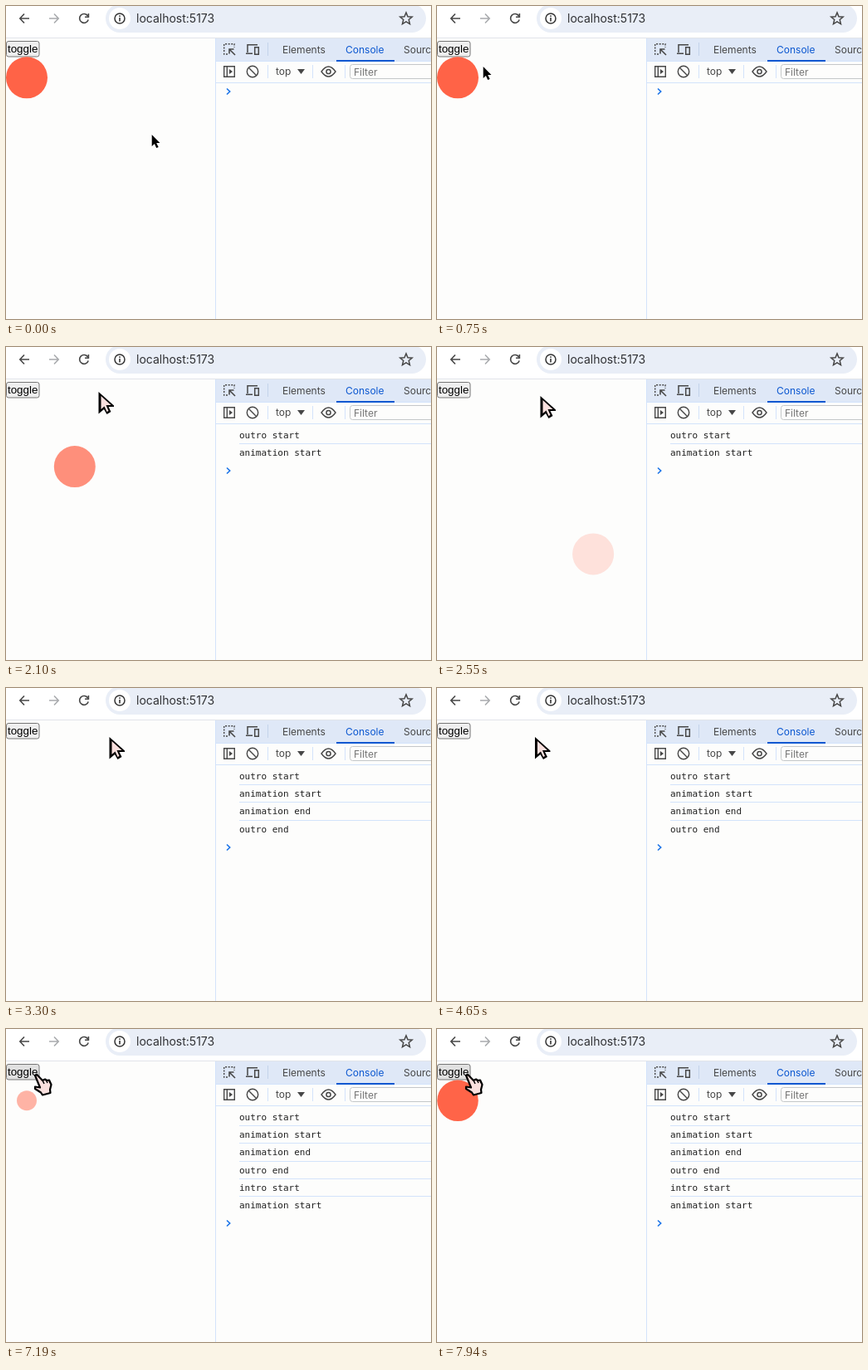
Recreate the animation shown at these times as an HTML page with a canvas. Size 512x377 px, loop 8 s.

```html
<!DOCTYPE html>
<html lang="en">
<head>
<meta charset="utf-8">
<title>Transition events</title>
<style>
  html, body { margin: 0; width: 100%; height: 100%; overflow: hidden; background: #fdfdfc; }
  canvas { display: block; }
</style>
</head>
<body>
<canvas id="stage" width="512" height="377"></canvas>
<script>
const ctx = document.getElementById('stage').getContext('2d');
const LOOP = 8000, STEP = 150, SHIFT = 5240;
const PAGE = '#fdfdfc', INK = '#474747', BLUE = '#0b57d0', LINE = '#d3e3fb', PINK = '#f9e0de';
const UI = 'Inter, sans-serif';

const LOGS = [
  [1350, 'outro start'], [1350, 'animation start'],
  [3300, 'animation end'], [3300, 'outro end'],
  [6290, 'intro start'], [6290, 'animation start']
];

// Pointer tip: time, x, y
const POINTER = [
  [0, 175, 155], [299, 175, 155], [300, 151, 154], [450, 119, 127], [600, 84, 97],
  [750, 55, 73], [900, 39, 58], [1050, 34, 53], [1200, 33, 52], [1500, 33, 52],
  [1650, 43, 53], [1800, 65, 54], [1950, 92, 54], [2100, 111.5, 54], [2250, 122, 58],
  [2400, 124.5, 59], [4500, 124.5, 59], [4650, 118, 59], [4800, 94, 58], [4950, 63, 56],
  [5100, 41, 55], [5240, 36, 55], [8000, 36, 55]
];

const cubicInOut = p => p < 0.5 ? 4 * p ** 3 : 1 - 4 * (1 - p) ** 3;
const progress = (t, start) => cubicInOut(Math.min(1, Math.max(0, (t - start) / 2000)));
const within = (t, a, b) => t >= a && t < b;

function rect(x, y, w, h, color) {
  ctx.fillStyle = color;
  ctx.fillRect(x, y, w, h);
}

function text(str, x, y, font, color) {
  ctx.font = font;
  ctx.fillStyle = color;
  ctx.fillText(str, x, y);
}

function stroke(d, color = INK, width = 1.4) {
  ctx.strokeStyle = color;
  ctx.lineWidth = width;
  ctx.stroke(new Path2D(d));
}

function fill(d, color) {
  ctx.fillStyle = color;
  ctx.fill(new Path2D(d));
}

function disc(x, y, r, color, alpha = 1) {
  ctx.globalAlpha = alpha;
  ctx.fillStyle = color;
  ctx.beginPath();
  ctx.arc(x, y, r, 0, 7);
  ctx.fill();
  ctx.globalAlpha = 1;
}

function ring(x, y, r, color, width) {
  ctx.strokeStyle = color;
  ctx.lineWidth = width;
  ctx.beginPath();
  ctx.arc(x, y, r, 0, 7);
  ctx.stroke();
}

function box(x, y, w, h, r, background, border) {
  ctx.beginPath();
  ctx.roundRect(x, y, w, h, r);
  ctx.fillStyle = background;
  ctx.fill();
  if (!border) return;
  ctx.strokeStyle = border;
  ctx.lineWidth = 1;
  ctx.stroke();
}

function starPath(x, y, outer, inner) {
  let d = '';
  for (let i = 0; i < 10; i++) {
    const r = i % 2 ? inner : outer, a = i * Math.PI / 5 - Math.PI / 2;
    d += `${i ? 'L' : 'M'}${x + r * Math.cos(a)} ${y + r * Math.sin(a)}`;
  }
  return d + 'Z';
}

function drawAddressBar() {
  rect(0, 0, 512, 38, '#fff');
  rect(0, 38, 512, 1, '#e1e4ea');
  stroke('M28 15H17M22 9.5L16.8 15L22 20.5', INK, 1.6);
  stroke('M52 15H63M58 9.5L63.2 15L58 20.5', '#a9abae', 1.6);
  stroke('M98.6 12A5.4 5.4 0 1 0 99.2 16.5M99.4 9V13.2H95', INK, 1.6);
  box(120, -2, 386, 34, 17, '#e9eef7');
  disc(137, 15, 13, '#fff');
  ring(137, 15, 6, '#333', 1.5);
  rect(136.2, 14, 1.6, 4.5, '#333');
  rect(136.2, 11.3, 1.6, 1.6, '#333');
  text('localhost:5173', 157, 20, '14px ' + UI, '#303134');
  stroke(starPath(482, 15.5, 7.6, 3.4), INK, 1.5);
}

function drawDevtools() {
  rect(253, 39, 259, 27, '#dfe8f7');
  rect(253, 66, 259, 1, LINE);
  rect(252, 39, 1, 338, LINE);
  rect(398, 65, 70, 2, BLUE);

  ctx.setLineDash([2, 1.6]);
  stroke('M267 58H262.7V45.7H275V50');
  ctx.setLineDash([]);
  stroke('M276 59L269 52M269 57.5V52H274.5', INK, 1.6);
  stroke('M291 56V46.7H303M289 57.3H297M299.7 49.7H304.3V58.3H299.7Z', INK, 1.5);
  rect(315, 44, 1, 16, '#c3d3ea');
  text('Elements', 333, 57, '12px ' + UI, INK);
  text('Console', 409, 57, '12px ' + UI, BLUE);
  text('Sources', 479, 57, '12px ' + UI, INK);

  stroke('M262.7 72.7H275.3V85.3H262.7ZM266.3 73V85');
  fill('M269 76L273 79L269 82Z', INK);
  ring(297, 79, 6.7, INK, 1.4);
  stroke('M292.3 74.3L301.7 83.7');
  for (const x of [315, 369, 408]) rect(x, 71, 1, 16, LINE);
  text('top', 325, 83, '12px ' + UI, INK);
  fill('M351 76H360L355.5 82Z', INK);
  stroke('M380 79Q388.5 67 397 79Q388.5 91 380 79Z');
  ring(388.5, 79, 2.6, INK, 1.5);
  box(414.5, 70.5, 110, 17, 3, PAGE, '#c4c7c9');
  text('Filter', 419, 84, '12px ' + UI, '#757575');
  rect(253, 92, 259, 1, LINE);
}

function drawLogs(t) {
  const shown = LOGS.filter(([at]) => t >= at);
  shown.forEach(([, label], i) => {
    const y = 106 + Math.round(i * 21.2);
    if (i) rect(281, y - 11, 231, 1, LINE);
    text(label, 281, y + 4, '11px "DejaVu Sans Mono", monospace', '#1f1f1f');
  });
  const y = shown.length ? 107 + Math.round(shown.length * 21.2) : 103;
  stroke(`M266 ${y - 3.5}L269.7 ${y}L266 ${y + 3.5}`, '#1a73e8', 1.6);
}

function drawBall(t) {
  let offset = 0, size = 1, alpha = 1;
  if (t < 6000) {
    const gone = progress(t, 1267);
    offset = gone * 200;
    alpha = 1 - gone;
  } else {
    size = alpha = progress(t, 6205);
  }
  if (alpha > 0.1) disc(25 + offset, 86.3 + offset, 25 * size, '#ff6347', alpha);
}

function drawButton(t, hovered) {
  const pressed = within(t, 1200, 1350) || within(t, 5990, 6290);
  const background = pressed ? '#f5f5f5' : hovered ? '#e1e1e1' : '#efefef';
  box(0.5, 42.5, 39.5, 18.5, 2.5, background, '#767676');
  text('toggle', 2, 56, '13.333px "Liberation Sans", Arial, sans-serif', '#000');
}

function pointerAt(t) {
  const i = Math.max(1, POINTER.findIndex(([at]) => at >= t));
  const [t0, x0, y0] = POINTER[i - 1], [t1, x1, y1] = POINTER[i];
  const k = (t - t0) / (t1 - t0);
  return [x0 + (x1 - x0) * k, y0 + (y1 - y0) * k];
}

function drawPointer(t, [x, y], hovered) {
  ctx.save();
  ctx.translate(x, y);
  ctx.lineJoin = 'round';
  if (hovered) {
    const hand = 'M-1 1L1 -.3L8 7L11 5.5L13 7L16 6.5L18.5 12L17 18L17.5 22L8 24.5L6 21.5L-1 17L-1 14.5L5 15.5Z';
    fill(hand, PINK);
    stroke(hand, '#000', 2.2);
    stroke('M8 7L10 11M12.5 7L14 10M16 7L17 10', '#000', 1.5);
  } else if (t < 1200) {
    const arrow = 'M0.7 0L10.5 10H6.2L8.7 15L6.2 16L3.9 11L0.7 14Z';
    stroke(arrow, '#fff', 2);
    fill(arrow, '#000');
  } else {
    fill('M0 0L18.5 16.5V18H12L15 24L10 27L6.5 21L0 26.5Z', '#000');
    fill('M3 5L15 16H9L12 23L10 24L7 17.5L3 21Z', PINK);
  }
  ctx.restore();
}

function draw(time) {
  const base = time < SHIFT ? 0 : SHIFT;
  const t = base + Math.floor((time - base) / STEP) * STEP;
  const tip = pointerAt(t);
  const hovered = tip[0] <= 41 && tip[1] <= 61;
  rect(0, 0, 512, 377, PAGE);
  drawAddressBar();
  drawDevtools();
  drawLogs(t);
  drawButton(t, hovered);
  drawBall(t);
  drawPointer(t, tip, hovered);
}

function tick() {
  draw(performance.now() % LOOP);
  requestAnimationFrame(tick);
}
tick();
</script>
</body>
</html>
```
